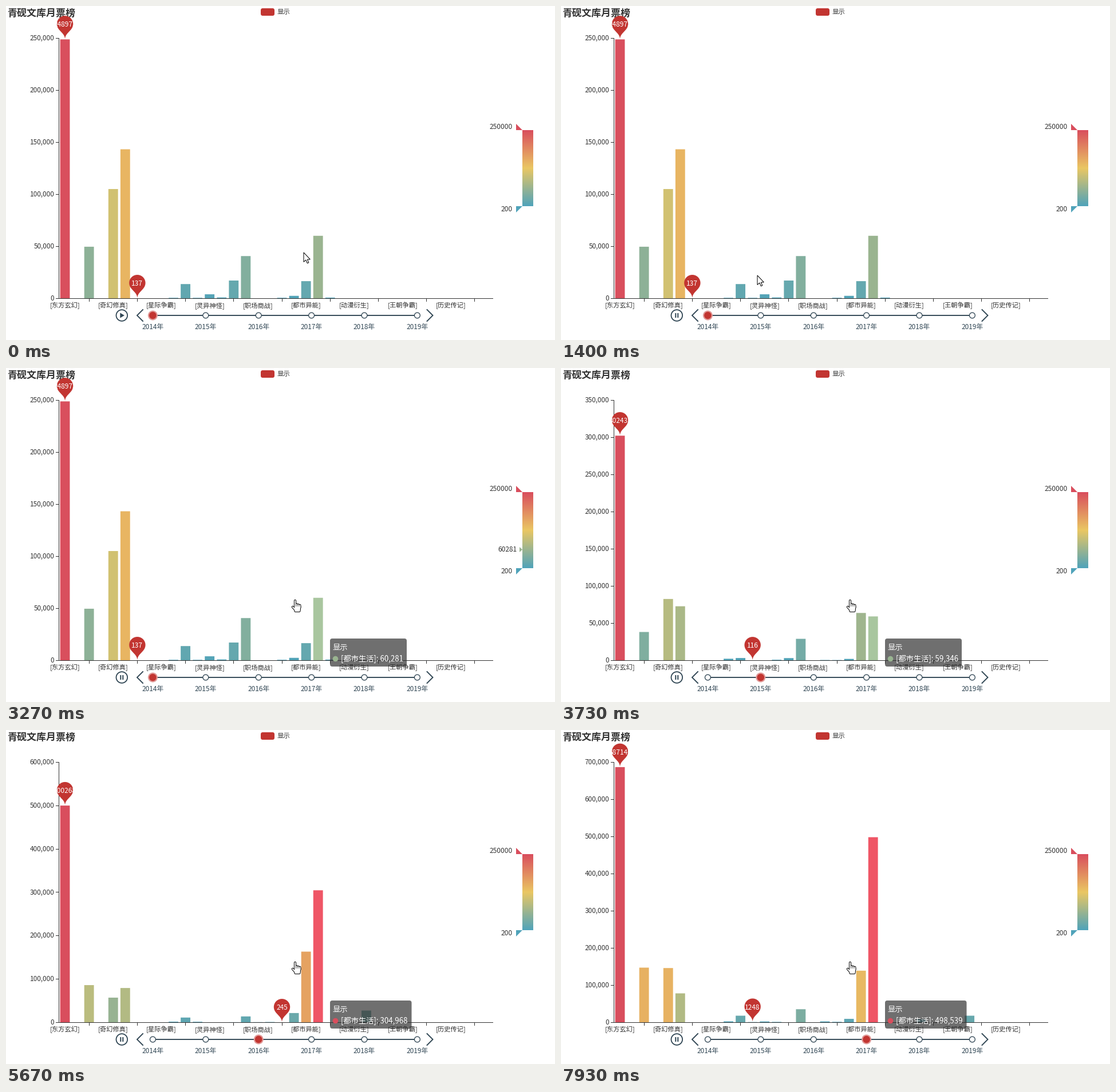
These frames come from a looping animation (959x584 px, 8000 ms). A matplotlib script:

```python
import math
import matplotlib.pyplot as plt
import numpy as np
from matplotlib.animation import FuncAnimation
from matplotlib.patches import Circle, FancyBboxPatch, Polygon, Rectangle, PathPatch
from matplotlib.path import Path

W, H, DPI = 959, 584, 100
LOOP, INTERVAL = 8000, 40
STEP = 200 / 3              # the screen refreshes 15 times a second

LEFT, RIGHT, TOP, BASE = 92.5, 850.5, 56.5, 511.5
N = 36
BAND = (RIGHT - LEFT) / N
BAR_W = BAND * 0.8
SCALE = 0.946               # zoom of the page

INK, SLATE, RED = "#333333", "#304654", "#c23531"
RAMP = np.array([[80, 163, 186], [234, 199, 99], [217, 78, 93]]) / 255
LOW, HIGH = 200, 250000

LABELS = ["东方玄幻", "奇幻修真", "星际争霸", "灵异神怪", "职场商战",
          "都市异能", "动漫衍生", "王朝争霸", "历史传记"]
HOT, HOT_NAME = 21, "都市生活"

# minor categories get a few random votes; the leaders are given per year
VOTES = np.zeros((4, N))
VOTES[:, 9:23] = np.random.default_rng(8).exponential(1300, (4, 14))
LEADERS = {
    0: (248973, 302431, 500268, 687140), 2: (49775, 38400, 86300, 147700),
    4: (105200, 82800, 57400, 146600), 5: (143400, 73000, 79600, 78500),
    10: (13900, 3400, 11500, 18400), 14: (17300, 3300, 800, 0),
    15: (40800, 29200, 14100, 35800), 19: (2600, 2200, 21900, 9900),
    20: (16700, 64000, 163500, 139500), HOT: (60281, 59346, 304968, 498539),
    25: (0, 0, 27600, 9000), 29: (0, 0, 0, 18400),
}
for cat, row in LEADERS.items():
    VOTES[:, cat] = row
LOWEST = [(6, 137), (11, 116), (18, 245), (11, 1248)]
for row, (cat, v) in zip(VOTES, LOWEST):
    row[cat] = v

STARTS = [3250, 5318, 7333]
SHIFT_MS = 300

# pointer path: step, x, y
PATH = np.array([[0, 520, 431], [2, 499, 440], [13, 159, 494], [14, 156, 491],
                 [19, 156, 491], [21, 343, 471], [25, 497, 420], [31, 505, 405]])
MOUSE_OFF = np.array([41, 48])   # drawn pointer lags the real mouse position
ROW_Y = 541
PLAY = np.array([202.3, ROW_Y])
CLICK_STEP, TIP_STEP = 19, 25

fig = plt.figure(figsize=(W / DPI, H / DPI), dpi=DPI, facecolor="white")
ax = fig.add_axes([0, 0, 1, 1])
ax.axis("off")


def pt(px):
    return px * 72 / DPI


def text(x, y, s, px=11.6, color=INK, ha="left", z=3, weight="normal"):
    """Text whose capitals are centred on y."""
    return ax.text(x, y + 0.36 * px, s, fontsize=pt(px), color=color, ha=ha,
                   va="baseline", zorder=z, weight=weight,
                   family="Noto Sans CJK JP")


def line(xs, ys, color=INK, px=1, z=2, **kw):
    return ax.plot(xs, ys, color=color, lw=pt(px), zorder=z, snap=False, **kw)[0]


def add(patch, z):
    patch.set_zorder(z)
    return ax.add_patch(patch)


def poly(points, color, z=3, **kw):
    return add(Polygon(points, facecolor=color, **{"lw": 0, **kw}), z)


def ramp(value):
    t = np.clip((value - LOW) / (HIGH - LOW), 0, 1)
    return np.array([np.interp(t, [0, 0.5, 1], RAMP[:, c]) for c in range(3)])


def nice_axis(peak):
    """Axis end and tick step for about five round intervals."""
    raw = peak / 5
    unit = 10 ** math.floor(math.log10(raw))
    step = unit * next(n for lim, n in ((1.5, 1), (2.5, 2), (4, 3), (7, 5), (10, 10))
                       if raw / unit < lim)
    return math.ceil(peak / step) * step, step


AXES = [nice_axis(row.max()) for row in VOTES]


def level(year, value):
    return BASE - value / AXES[year][0] * (BASE - TOP)


def center(i):
    return LEFT + (i + 0.5) * BAND


def mix(a, b, p):
    return a + (b - a) * p


# ---- fixed parts -----------------------------------------------------------
text(2, 11.5, "青砚文库月票榜", 17, weight="bold")
add(FancyBboxPatch((445, 4), 24, 13, boxstyle="round,pad=0,rounding_size=3.5",
                   facecolor=RED, lw=0), 3)
text(474, 9.5, "显示", 11.4)

line([LEFT, LEFT], [TOP, BASE])
line([LEFT, RIGHT], [BASE, BASE])
for j, name in enumerate(LABELS):
    text(center(4 * j), 522.6, f"[{name}]", 11.3, ha="center")
    x = math.floor(LEFT + (4 * j + 2.5) * BAND) + .5
    line([x, x], [BASE, BASE + 5])

ax.imshow(np.array([ramp(v) for v in np.linspace(HIGH, LOW, 133)])[:, None],
          extent=(902, 921, 350, 217), aspect="auto", zorder=2)
ax.set_xlim(0, W)
ax.set_ylim(H, 0)
for y, d, v in ((217, -11, HIGH), (350, 11, LOW)):
    poly([(891, y), (902, y), (891, y + d)], ramp(v))
    text(885, y + d * .5 - 1, f"{v}", 11.9, ha="right")

YEAR_X = [256.4 + 92.4 * j for j in range(6)]
line([YEAR_X[0], YEAR_X[-1]], [ROW_Y] * 2, SLATE, 1.9)
for j, x in enumerate(YEAR_X):
    add(Circle((x, ROW_Y), 4.9, facecolor="white", edgecolor=SLATE, lw=pt(1.3)), 3)
    text(x, 560.5, f"{2014 + j}年", 11.8, SLATE, "center")
for x, d in ((229, 10), (745.5, -10)):
    line([x + d, x, x + d], [ROW_Y - 10, ROW_Y, ROW_Y + 10], SLATE, 1.9,
         solid_joinstyle="miter")

# ---- moving parts ----------------------------------------------------------
bars = [add(Rectangle((center(i) - BAR_W / 2, BASE), BAR_W, 0, lw=0, snap=False), 1)
        for i in range(N)]
tick_text = [text(84.5, 0, "", 11.7, ha="right") for _ in range(8)]
tick_line = line([], [])

halo = add(Circle((0, ROW_Y), 8.5, facecolor="#e19a98", lw=0), 4)
dot = add(Circle((0, ROW_Y), 6.3, facecolor=RED, lw=0), 5)
ring = add(Circle(PLAY, 9.8, facecolor="none", lw=pt(1.8)), 3)
play = poly([PLAY + d for d in ((-3, -4.5), (4.6, 0), (-3, 4.5))], SLATE)
pause = [add(Rectangle(PLAY + (d, -4), 2, 8, lw=0, snap=False), 3)
         for d in (-3, 1)]


def pin_path(x, y):
    """Map pin with its tip at (x, y)."""
    r, h = 15 * SCALE, 50 * SCALE
    dy = r * r / (h - r)
    cy = y - h + r + dy
    a = np.arcsin(dy / r)
    dx = np.cos(a) * r
    th = np.linspace(np.pi - a, 2 * np.pi + a, 40)
    arc = list(zip(x + r * np.cos(th), cy + r * np.sin(th)))
    cx, by = np.sin(a) * r * .6, cy + dy + np.cos(a) * r * .6
    neck = (x, y - r * .7)
    curve = [(x + dx - cx, by), neck, (x, y), neck, (x - dx + cx, by),
             (x - dx, cy + dy)]
    codes = [Path.MOVETO] + [Path.LINETO] * 39 + [Path.CURVE4] * 6
    return Path(arc + curve, codes), cy


class Pin:
    def __init__(self):
        self.shape = add(PathPatch(pin_path(0, 0)[0], facecolor=RED, lw=0), 6)
        self.label = text(0, 0, "", 12, "white", "center", 7)

    def place(self, x, y, value):
        path, cy = pin_path(x, y)
        self.shape.set_path(path)
        self.label.set_position((x, cy + .8 + 0.36 * 12))
        self.label.set_text(f"{value:.0f}")


top_pin, low_pin = Pin(), Pin()

mark_text = text(893, 317, f"{VOTES[0, HOT]:.0f}", 11.9, ha="right")
mark = poly([(897, 313), (902, 317.5), (897, 322)], ramp(VOTES[0, HOT]))

tip_box = add(FancyBboxPatch((0, 0), 10, 49, facecolor=(.196, .196, .196, .7), lw=0,
                             boxstyle="round,pad=0,rounding_size=4"), 8)
tip_head = text(0, 0, "显示", 13.3, "white", z=9)
tip_body = text(0, 0, "", 13.3, "white", z=9)
tip_dot = add(Circle((0, 0), 4.8, lw=0), 9)
tip = [tip_box, tip_head, tip_body, tip_dot]

ARROW = np.array([(0, 0), (0, 16.5), (3.8, 13), (6.3, 18.8), (8.8, 17.7),
                  (6.4, 12.2), (11.3, 12)])
arrow = poly(ARROW, "white", 20, edgecolor="black", lw=pt(1))

# the hand is a set of round strokes: fingers, thumb and palm
PALM = np.array([(0, 13), (8.4, 13), (7.4, 20), (.4, 20)])
GAP = [(np.nan, np.nan)]
STROKES = [(-4.2, 12.8), (0, 17.5)] + GAP + [*PALM, PALM[0]]
for j in range(4):
    STROKES += GAP + [(2.8 * j, 7.4 + .8 * j if j else 1.8), (2.8 * j, 13)]
STROKES = np.array(STROKES)
hand_lines = [line([], [], color, px, z, solid_capstyle="round",
                   solid_joinstyle="round")
              for color, px, z in (("black", 4.1, 20), ("white", 2.1, 21))]
palm = poly(PALM, "white", 22)


def draw_pointer(pos, is_hand):
    arrow.set_xy(ARROW + pos)
    palm.set_xy(PALM + pos)
    arrow.set_visible(not is_hand)
    for part in hand_lines:
        part.set_data(*(STROKES + pos).T)
    for part in (palm, *hand_lines):
        part.set_visible(is_hand)


def draw_axis(prev, year, p):
    """Ticks known from the previous axis slide, new ones stand still."""
    top, step = AXES[year]
    old_top, old_step = AXES[prev]
    xs, ys = [], []
    for j, label in enumerate(tick_text):
        v = j * step
        label.set_visible(v <= top)
        if v > top:
            continue
        y = level(year, v)
        if v <= old_top and v % old_step == 0:
            y = mix(level(prev, v), y, p)
        label.set_position((84.5, y - 1 + 0.36 * 11.7))
        label.set_text(f"{v:,}")
        xs += [LEFT - 5, LEFT, np.nan]
        ys += [math.floor(y) + .5] * 2 + [np.nan]
    tick_line.set_data(xs, ys)


def draw_tip(k, votes):
    again = k >= TIP_STEP
    for part in tip:
        part.set_visible(again or 1 <= k <= 4)
    p = 1 - (1 - min((k - TIP_STEP) / 6, 1)) ** 4 if again else 0
    x, y = mix(560, 566, p), mix(506, 473, p)
    tip_box.set_bounds(x, y, 134 if votes < 100000 else 142.5, 49)
    tip_head.set_position((x + 4.5, y + 20.3))
    tip_body.set_position((x + 19, y + 39.8))
    tip_body.set_text(f"[{HOT_NAME}]: {votes:,.0f}")
    tip_dot.set_center((x + 9.5, y + 35.5))
    tip_dot.set_facecolor(ramp(votes))


def update(i):
    k = int((i + .5) * INTERVAL / STEP)
    t = k * STEP
    year = sum(t >= s for s in STARTS)
    prev = max(year - 1, 0)
    since = t - STARTS[year - 1] if year else SHIFT_MS
    u = min(since / SHIFT_MS, 1)
    p = 1 - (1 - u) ** 3

    pos = np.array([np.interp(k, PATH[:, 0], PATH[:, c]) for c in (1, 2)])
    mouse = pos + MOUSE_OFF
    hover = bool(abs(mouse[0] - center(HOT)) < BAR_W / 2)
    on_play = bool(np.hypot(*(mouse - PLAY)) < 11)

    def moved(a, b):
        """Height on the way from last year's bar a to this year's bar b."""
        return mix(level(prev, VOTES[prev, a]), level(year, VOTES[year, b]), p)

    draw_axis(prev, year, p)
    for j, bar in enumerate(bars):
        y = moved(j, j)
        bar.set_y(y)
        bar.set_height(BASE - y)
        color = ramp(VOTES[year, j])
        if j == HOT and hover:
            color = np.minimum(color * 1.1, 1)
        bar.set_facecolor(color)

    (a, _), (b, low) = LOWEST[prev], LOWEST[year]
    top_pin.place(center(0), moved(0, 0), VOTES[year, 0])
    low_pin.place(mix(center(a), center(b), p), moved(a, b), low)

    q = 16 * u ** 5 if u < .5 else 1 - 16 * (1 - u) ** 5
    for c in (halo, dot):
        c.set_center((mix(YEAR_X[prev], YEAR_X[year], q), ROW_Y))

    tint = RED if on_play else SLATE
    playing = k >= CLICK_STEP
    ring.set_edgecolor(tint)
    play.set_visible(not playing)
    play.set_facecolor(tint)
    for bar in pause:
        bar.set_visible(playing)
        bar.set_facecolor(tint)

    for part in (mark, mark_text):
        part.set_visible(hover and year == 0)
    # the tooltip text follows the new data a moment later
    draw_tip(k, VOTES[prev if since < 10 else year, HOT])
    draw_pointer(pos, hover or on_play)
    return []


anim = FuncAnimation(fig, update, frames=LOOP // INTERVAL, interval=INTERVAL,
                     init_func=lambda: update(0), repeat=True, repeat_delay=0,
                     blit=False, cache_frame_data=False)
plt.show()
```
